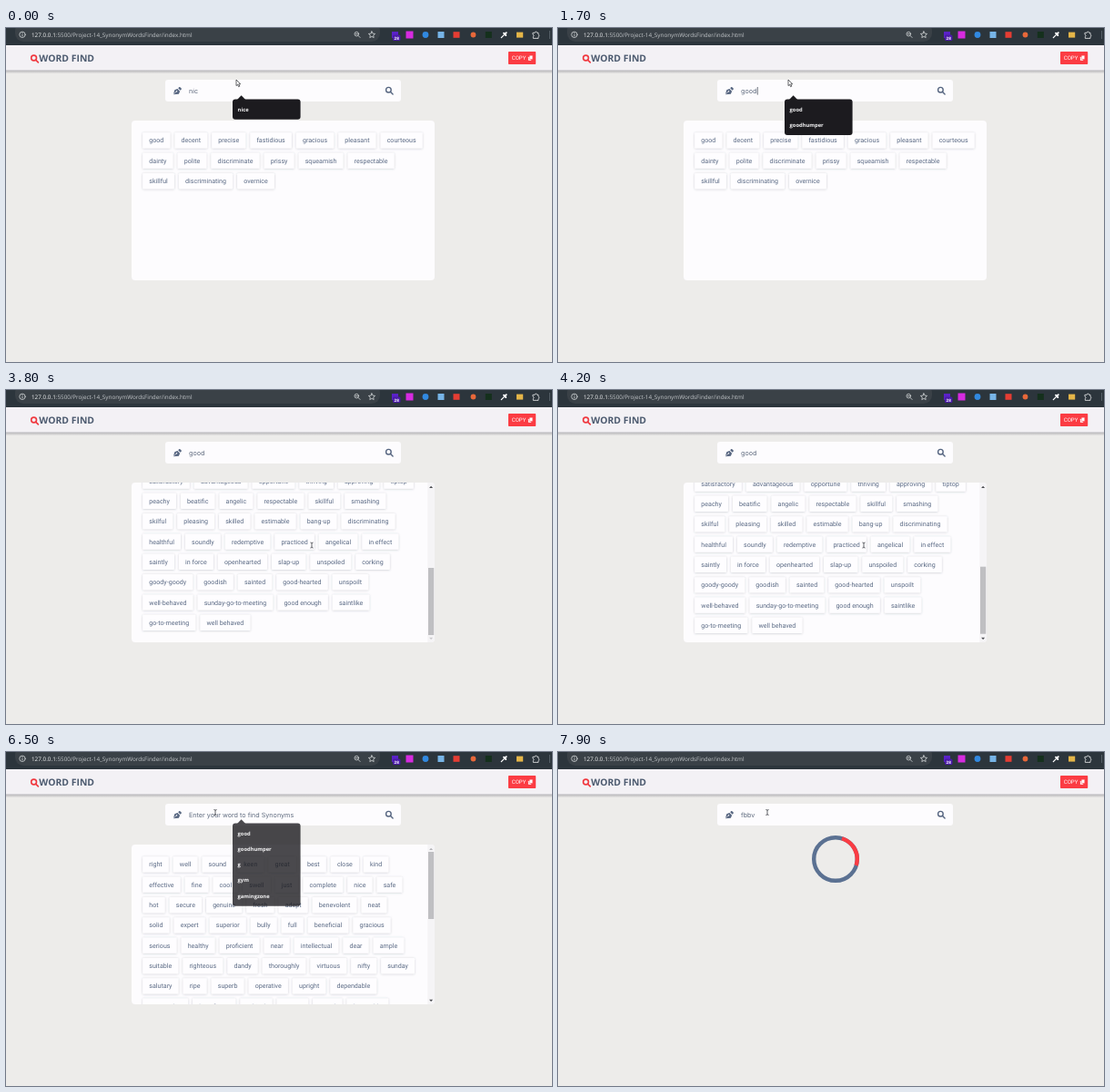
An HTML page that plays this animation: 600x368 px, repeating every 8 s.

```html
<!DOCTYPE html>
<html lang="en">
<head>
<meta charset="utf-8">
<title>Word Find</title>
<style>
html, body { margin: 0; width: 100%; height: 100%; overflow: hidden; background: #edecea; }
svg { display: block; width: 600px; height: 368px; }
text { text-rendering: geometricPrecision; white-space: pre; }
.url { font: 6.33px "Open Sans", sans-serif; fill: #c3c7ca; }
.logo { font: 700 10.4px "Open Sans", sans-serif; fill: #4d5b70; }
.copy { font: 6.1px Roboto, sans-serif; fill: #fff; }
.field { font: 7.2px Inter, sans-serif; fill: #5f6b7e; }
.chip { font: 7.1px Roboto, sans-serif; fill: #5a6a84; }
.hint { font: 700 5.8px "Open Sans", sans-serif; fill: #f4f4f5; }
.badge { font: 700 4.6px Roboto, sans-serif; fill: #fff; text-anchor: middle; }
.line { fill: none; stroke-linecap: round; stroke-linejoin: round; }
</style>
</head>
<body>
<svg viewBox="0 0 600 368" xmlns="http://www.w3.org/2000/svg">
  <defs>
    <linearGradient id="fade" x2="0" y2="1">
      <stop offset="0" stop-color="#8e8c92" stop-opacity=".6"/>
      <stop offset="1" stop-color="#8e8c92" stop-opacity="0"/>
    </linearGradient>
    <filter id="lift" x="-5%" y="-5%" width="110%" height="110%">
      <feDropShadow dx="0" dy=".4" stdDeviation=".8" flood-color="#3c4050" flood-opacity=".28"/>
    </filter>
    <clipPath id="view"><rect x="138" y="102" width="333" height="176" rx="4"/></clipPath>
  </defs>

  <rect width="600" height="368" fill="#edecea"/>

  <!-- browser bar -->
  <rect width="600" height="19" fill="#2c353c"/>
  <rect x="10" y="-6" width="401" height="21" rx="9" fill="#3a4147"/>
  <g class="line" stroke="#d5d8da" stroke-width=".8">
    <circle cx="18" cy="7.3" r="3.2"/>
    <path d="M18 7v1.9M18 5.5v.1"/>
    <circle cx="385.3" cy="6.6" r="2.3"/>
    <path d="M387 8.4l2.1 2.1M384.3 6.6h2"/>
    <path d="M402 3.8l1.1 2.3 2.5.3-1.9 1.7.5 2.5-2.2-1.2-2.2 1.2.5-2.5-1.9-1.7 2.5-.3z"/>
    <path d="M579.3 5.3h1.9a1.2 1.2 0 0 1 2.4 0h1.4v2a1.2 1.2 0 0 1 0 2.3v1.8h-5.7V9.4a1.1 1.1 0 0 0 0-2.1z" stroke="#eceeef"/>
  </g>
  <text class="url" x="28" y="9.7"><tspan fill="#f3f4f5">127.0.0.1</tspan>:5500/Project-14_SynonymWordsFinder/index.html</text>
  <rect x="424" y="4" width="7" height="7" fill="#5a22c8"/>
  <rect x="425" y="7.5" width="8.5" height="6.5" rx="1.5" fill="#4a19a8"/>
  <text class="badge" x="429.2" y="12.5">28</text>
  <rect x="439.5" y="3.5" width="8" height="8" fill="#d62be0"/>
  <circle cx="461" cy="7.5" r="3.4" fill="#3189e0"/>
  <rect x="474.5" y="4" width="7" height="7" fill="#76b4e6"/>
  <rect x="491.5" y="4.2" width="7" height="6.6" fill="#e53d33"/>
  <circle cx="513.5" cy="7.5" r="2.9" fill="#e8683a"/>
  <rect x="526.8" y="4" width="7" height="7" fill="#14301c"/>
  <rect x="561" y="4.6" width="7.2" height="6" fill="#e4b548"/>
  <path class="line" d="M544.3 10.6l3.5-3.5" stroke="#fff" stroke-width="1.3"/>
  <path class="line" d="M547 5.7l2.3 2.3M548.3 6.7l1.5-1.5" stroke="#fff" stroke-width="1.9"/>
  <path d="M597.5 3v9" stroke="#67727a" stroke-width=".7"/>

  <!-- page header -->
  <rect y="19" width="600" height="28" fill="#f3f1f5"/>
  <rect y="46.5" width="600" height="4" fill="url(#fade)"/>
  <g class="line" stroke="#f0383f" stroke-width="1.6">
    <circle cx="30.6" cy="33" r="2.9"/><path d="M32.9 35.4l2.5 2.5"/>
  </g>
  <text class="logo" x="36.3" y="37.2">WORD FIND</text>
  <rect x="552" y="26" width="30.2" height="14" rx=".8" fill="#fb3c43"/>
  <text class="copy" x="555.7" y="35.4">COPY</text>
  <rect x="573.9" y="31.8" width="3.3" height="4" rx=".5" fill="#fff"/>
  <rect x="575.2" y="30.2" width="3.6" height="4.3" rx=".5" fill="#fff" stroke="#fb3c43" stroke-width=".5"/>

  <!-- search field -->
  <rect x="175" y="57" width="259" height="24" rx="3" fill="#fdfcfe"/>
  <g fill="#566580">
    <path d="M183.9 73.3l1.4-5 3.2-1.2 2.6 2.6-1.2 3.1z"/>
    <path d="M189.2 66.3l1.2-1.2q.5-.3 1 .1l1.3 1.4q.3.4 0 .9l-1.2 1.2z"/>
    <path d="M184 73.2l3.2-3.2" stroke="#fdfcfe" stroke-width=".6"/>
    <circle cx="187.5" cy="69.8" r=".8" fill="#fdfcfe"/>
  </g>
  <g class="line" stroke="#566580" stroke-width="1.4">
    <circle cx="420.4" cy="68.2" r="2.8"/><path d="M422.6 70.5l2.5 2.5"/>
  </g>
  <text class="field" id="typed" x="201" y="71.6"></text>
  <rect id="caret" y="65" width=".7" height="8.6" fill="#333a46"/>

  <!-- results -->
  <g id="panel">
    <rect x="138" y="102" width="333" height="176" rx="4" fill="#fdfcfe"/>
    <g clip-path="url(#view)">
      <g id="first"></g>
      <g id="second"></g>
      <g id="bar">
        <rect x="463.3" y="102" width="7.7" height="176" fill="#f5f4f6"/>
        <rect id="thumb" x="464" width="6.2" height="74" fill="#bfbfc2"/>
        <path id="up" d="M465.1 108l2-2.3 2 2.3z"/>
        <path id="down" d="M465.1 272.8l2 2.3 2-2.3z"/>
      </g>
    </g>
  </g>

  <g id="loader" fill="none" stroke-width="4.4">
    <circle cx="305" cy="118" r="23.8" stroke="#5b7192"/>
    <path id="arc" d="M288.17 101.17A23.8 23.8 0 0 1 321.83 101.17" stroke="#fb3c43"/>
  </g>

  <g id="popup">
    <path d="M254 79l4.6-4.8 4.6 4.8z" fill="#1c1b1f"/>
    <rect id="box" x="249" y="78.4" width="74.6" rx="3" fill="#1c1b1f"/>
    <g id="hints"></g>
  </g>

  <path id="arrow" d="M0 0v6.6l1.5-1.3 1.1 2.4 1.2-.5L2.7 4.8h2z" fill="#fff" stroke="#26282c" stroke-width=".7" stroke-linejoin="round"/>
  <path id="beam" class="line" d="M-1.2-3q1.2 0 1.2.8v4.4q0 .8-1.2.8M1.2-3Q0-3 0-2.2M0 2.2q0 .8 1.2.8" stroke="#33363c" stroke-width=".75"/>
</svg>

<script>
const LOOP = 8000, LEFT = 150.2, TOP = 115.3, PITCH = 22.33, MAX_SCROLL = 202.5;
const $ = id => document.getElementById(id);
const show = (id, on) => $(id).setAttribute("display", on ? "inline" : "none");
const set = (id, key, value) => $(id).setAttribute(key, value);
const clamp = x => Math.max(0, Math.min(1, x));
const ramp = (t, a, b) => clamp((t - a) / (b - a));
const ease = x => x * x * (3 - 2 * x);

function add(parent, tag, attrs, label) {
  const node = document.createElementNS("http://www.w3.org/2000/svg", tag);
  for (const key in attrs) node.setAttribute(key, attrs[key]);
  if (label) node.textContent = label;
  parent.appendChild(node);
  return node;
}

// One chip per comma-separated word, one row per line.
function chips(parent, words) {
  const cards = add(parent, "g", { filter: "url(#lift)" });
  words.trim().split("\n").forEach((row, i) => {
    let x = LEFT;
    const y = TOP + i * PITCH;
    for (const word of row.trim().split(",")) {
      const label = add(parent, "text", { class: "chip", x: x + 7.1, y: y + 11.1 }, word);
      const width = label.getComputedTextLength() + 14.2;
      add(cards, "rect", { x, y, width, height: 17.2, rx: 1.2, fill: "#fefdff" });
      x += width + 5;
    }
  });
}

chips($("first"), `
  good,decent,precise,fastidious,gracious,pleasant,courteous
  dainty,polite,discriminate,prissy,squeamish,respectable
  skillful,discriminating,overnice`);

chips($("second"), `
  right,well,sound,keen,great,best,close,kind
  effective,fine,cool,swell,just,complete,nice,safe
  hot,secure,genuine,fresh,adept,benevolent,neat
  solid,expert,superior,bully,full,beneficial,gracious
  serious,healthy,proficient,near,intellectual,dear,ample
  suitable,righteous,dandy,thoroughly,virtuous,nifty,sunday
  salutary,ripe,superb,operative,upright,dependable
  commodity,beneficent,ethical,potent,moral,honorable
  satisfactory,advantageous,opportune,thriving,approving,tiptop
  peachy,beatific,angelic,respectable,skillful,smashing
  skilful,pleasing,skilled,estimable,bang-up,discriminating
  healthful,soundly,redemptive,practiced,angelical,in effect
  saintly,in force,openhearted,slap-up,unspoiled,corking
  goody-goody,goodish,sainted,good-hearted,unspoilt
  well-behaved,sunday-go-to-meeting,good enough,saintlike
  go-to-meeting,well behaved`);

const NICE = ["nice"];
const GOOD = ["good", "goodhumper"];
const ALL_G = [...GOOD, "g", "gym", "gamingzone"];

// [time, field text, suggestions]
const typing = [
  [0, "nic", NICE], [150, "ni", NICE], [300, "n", NICE], [450, "", NICE],
  [880, "g", ALL_G], [1300, "go", GOOD], [1450, "goo", GOOD], [1600, "good", GOOD],
  [5900, "goo", GOOD], [6100, "go", GOOD], [6280, "g", ALL_G], [6450, "", ALL_G],
  [6800, "f", []], [6950, "fb", []], [7080, "fbb", []], [7200, "fbbv", []]
];

// [from, fully shown, fade start, gone]
const popups = [[-2, -1, 460, 600], [880, 980, 1880, 2000], [5900, 5990, 6470, 6620]];

// [time, x, y] of the pointer
const moves = [
  [0, 253, 57], [2250, 253, 57], [3050, 336, 145], [3200, 336, 145], [3400, 336, 171],
  [4850, 336, 171], [5180, 230, 76], [5280, 230, 76], [5500, 230, 66.5], [LOOP, 230, 66.5]
];

function pointer(t) {
  const i = moves.findIndex(m => m[0] > t);
  const [t0, x0, y0] = moves[i - 1], [t1, x1, y1] = moves[i];
  const k = ease(ramp(t, t0, t1));
  return [x0 + (x1 - x0) * k, y0 + (y1 - y0) * k];
}

let listed;
function suggest(list) {
  if (listed === list) return;
  listed = list;
  $("hints").replaceChildren();
  list.forEach((word, i) =>
    add($("hints"), "text", { class: "hint", x: 254.6, y: 91.5 + i * 17.25 }, word));
  set("box", "height", 5 + list.length * 17.25);
}

function draw(t) {
  const [, value, list] = typing.filter(s => s[0] <= t).pop();
  const typed = $("typed");
  const label = value || "Enter your word to find Synonyms";
  if (typed.textContent !== label) typed.textContent = label;
  const focused = (t > 880 && t < 1950) || (t > 5600 && t < 6400) || (t > 6800 && t < 7500);
  show("caret", focused && value);
  set("caret", "x", 201.4 + (value ? typed.getComputedTextLength() : 0));

  const opacity = Math.max(...popups.map(([a, b, c, d]) => Math.min(ramp(t, a, b), 1 - ramp(t, c, d))));
  show("popup", opacity > 0);
  set("popup", "opacity", opacity);
  suggest(list);

  const found = t >= 2050, loading = t >= 7556;
  show("panel", !loading);
  show("first", !found);
  show("second", found);
  show("bar", found);
  const down = ease(ramp(t, 3230, 3750)) - ease(ramp(t, 4150, 4850));
  set("second", "transform", `translate(0 ${-down * MAX_SCROLL})`);
  set("thumb", "y", 110 + 86 * down);
  set("up", "fill", down > 0 ? "#4a4b50" : "#b4b4b8");
  set("down", "fill", down < 1 ? "#4a4b50" : "#c9c9cc");

  show("loader", loading);
  set("arc", "transform", `rotate(${(t - 7556) * 0.18} 305 118)`);

  const beam = (t > 3330 && t < 4880) || t > 5400;
  const at = `translate(${pointer(t)})`;
  show("beam", beam);
  show("arrow", !beam);
  set("beam", "transform", at);
  set("arrow", "transform", at);
}

const start = performance.now();
function tick() {
  draw((performance.now() - start) % LOOP);
  requestAnimationFrame(tick);
}
tick();
</script>
</body>
</html>
```
